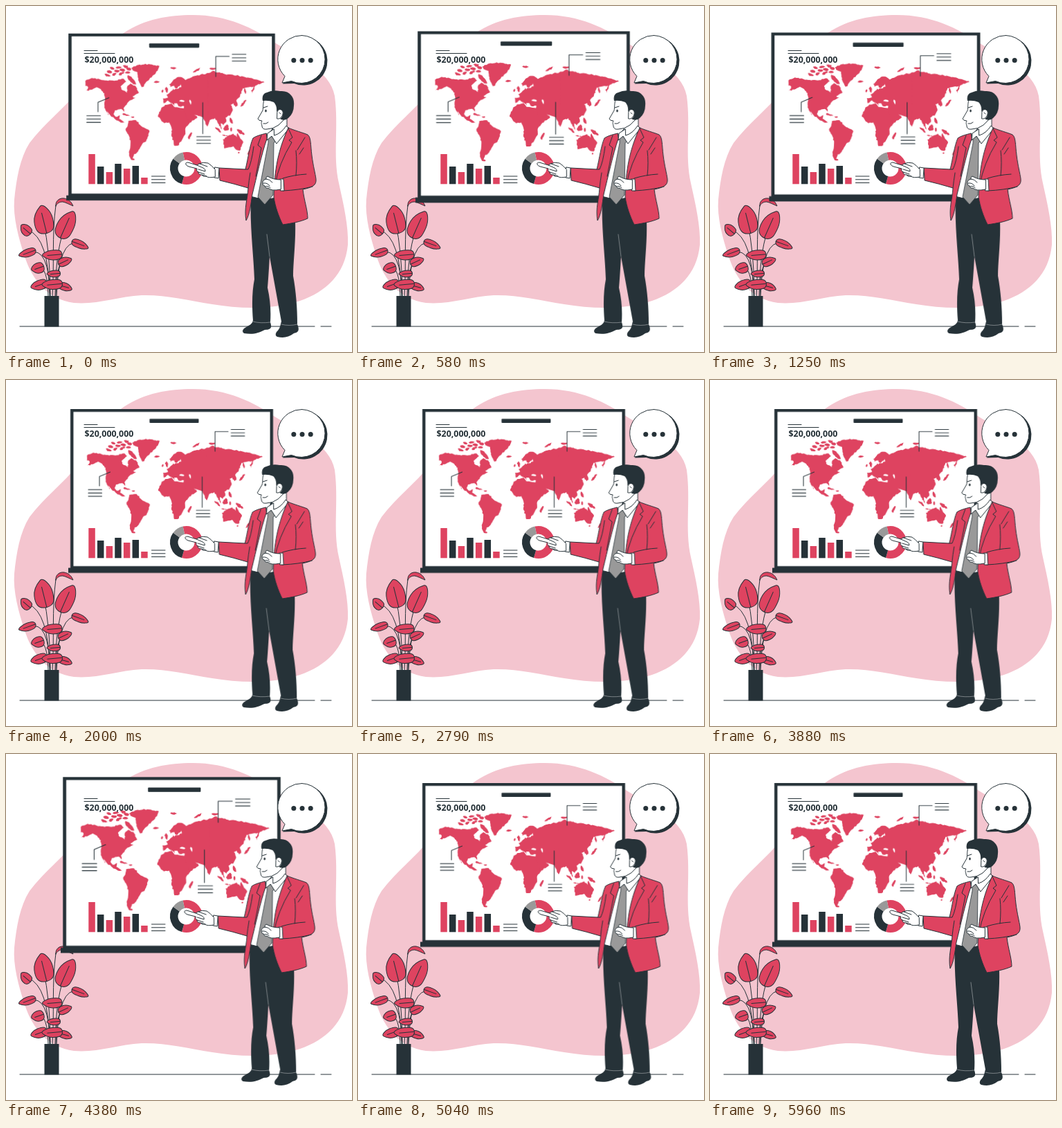
Animation of 500x500 px, one loop 6000 ms. Source, as an HTML page:

```html
<!DOCTYPE html>
<html lang="en">
<head>
<meta charset="utf-8">
<title>Presentation</title>
<style>
  :root { --ink: #263238; --pink: #de4360; --gray: #999; }
  html, body { margin: 0; width: 100%; height: 100%; overflow: hidden; background: #fff; }
  svg { display: block; width: 100vw; height: 100vh; }
  path, circle, ellipse, rect { stroke-linecap: round; stroke-linejoin: round; }
  .k { fill: var(--ink); }
  .r { fill: var(--pink); }
  .l { fill: none; stroke: var(--ink); stroke-width: 1; }
  .p { fill: var(--pink); stroke: var(--ink); stroke-width: 1; }
  .w { fill: #fff; stroke: var(--ink); stroke-width: 1; }
  .g { fill: var(--gray); stroke: var(--ink); stroke-width: .8; }
  .sum { font: 700 12.4px "Open Sans", "Noto Sans", Roboto, sans-serif; font-stretch: 75%; }
  .board {
    transform-origin: 239.5px 160px;
    animation: beat 3s linear -40ms infinite;
  }
  .man { animation: shake 6s linear -40ms infinite; }
  @keyframes beat {
    0%, 30%, 40%, 60%, 100% { transform: scale(1); }
    10%, 50% { transform: scale(1.1); }
  }
  @keyframes shake {
    0%, 100% { transform: translateX(0); }
    10%, 90% { transform: translateX(-1px); }
    20%, 80% { transform: translateX(2px); }
    30%, 50%, 70% { transform: translateX(-4px); }
    40%, 60% { transform: translateX(4px); }
  }
</style>
</head>
<body>
<svg viewBox="0 0 500 500">
  <path fill="#f4c5cf" d="M270 13C320 13 358 32 390 54C420 72 468 92 475 130C481 175 472 215 481 256C488 288 495 318 494 345C490 388 462 413 425 426C385 439 340 438 298 431C262 425 230 417 196 418C160 420 132 432 98 429C60 424 38 396 27 362C18 335 10 305 12 280C15 250 20 220 34 198C54 171 82 150 105 122C130 90 140 60 170 39C200 19 235 13 270 13Z"/>
  <path class="l" d="M20 463H446M455 463H470"/>

  <g id="plant">
    <path class="l" d="M72 288C66 330 70 380 67 420M54 312Q64 355 64 420M87 316Q72 345 71 420M32 324Q62 334 63 420M34 357Q62 345 64 420M104 343Q76 335 73 420M79 371Q72 385 72 420M47 379Q60 375 61 420"/>
    <path class="p" d="M72 289C71 282 77 277 84 278C91 279 95 284 97 289C92 287 87 284 82 283C77 283 74 285 72 289Z"/>
  </g>
  <rect class="k" x="55.5" y="419" width="21" height="44.5"/>

  <g class="board">
    <rect class="k" x="93" y="42" width="293" height="232"/>
    <rect x="97.5" y="46" width="284" height="223" fill="#fff"/>
    <rect class="k" x="90" y="271.5" width="299" height="7.3"/>
    <rect class="k" x="207.5" y="56" width="71" height="6" rx="1"/>
    <g id="map"></g>
    <path class="l" d="M150.5 133L135 139.5V153M302 103V74.5H321M283.5 140V184"/>
    <g id="notes"></g>
  </g>

  <path class="l" d="M113 64.5H132M113 68.5H157"/>
  <g id="legend"></g>
  <text class="sum k" x="113.5" y="82">$20,000,000</text>
  <g id="bars"></g>
  <g id="donut" fill="none" stroke-width="11.5"></g>

  <path class="k" d="M429.5 44.5a35 35 0 1 1-13 67.5L400 112.5L405 103.5A35 35 0 0 1 429.5 44.5Z"/>
  <path class="w" d="M427.5 42.5a34.5 34.5 0 1 1-15 66L399 111L403 101.5A34.5 34.5 0 0 1 427.5 42.5Z"/>
  <g id="dots" class="k"></g>

  <g class="man">
    <path class="k" d="M354 274L388 276L418 312C419 340 415 370 415 390C419 412 421 436 421 460C425 469 422 472 416 473C408 479 401 480 392 478Q388 476 391 471C397 465 396 462 398 456L381 362C380 380 379 395 378 407C382 425 383 440 382 457C385 466 382 468 374 468C364 473 357 475 344 473Q340 470 344 466C352 461 356 460 357 454C355 430 356 410 359 395C358 360 352 318 354 274Z"/>
    <path d="M381 362L377 330M357 456Q368 459 382 457M398 460Q409 463 421 460" fill="none" stroke="#fff" stroke-width=".6" opacity=".65"/>

    <path class="w" d="M376 188L386 177L405 174L404 194L392 277Q372 281 353 275L360 230Z"/>
    <path class="w" d="M386 169L385 182L389 189L406 175V158Z"/>
    <path class="g" d="M382 189L389 188L391 193L387 198L386 273L374 287L364 276L379 198V193Z"/>
    <path class="w" d="M387 178L378 184L377 194L384 188L391 199L409 177L405 173Q398 184 388 187Z"/>

    <path class="p" d="M376 184C368 186 361 188 357 191C352 202 350 220 346 236L308 234L309 252Q330 257 350 263C349 280 344 292 347 310C352 302 354 286 356 272C362 248 369 215 377 192Z"/>
    <path class="l" d="M358 203Q355 226 350 236H346M353 241Q351 253 350 263M369 187L364 201L369 205L361 246"/>
    <path class="p" d="M408 176C417 180 429 183 436 186C441 190 440 200 442 216C444 232 447 242 448 250C449 259 443 262 429 265C431 282 436 295 436 307C425 312 413 314 400 316C394 304 389 290 387 276C388 246 390 215 408 176Z"/>
    <path class="l" d="M408 177L414 190L409 194L413 197Q394 228 389 258M419 209Q421 226 419 245M432 190L421 208M430 205L424 214M400 249Q416 244 434 243M400 267Q424 266 443 261"/>

    <path class="w" d="M396 250H401L402 267H397Z"/>
    <path class="w" d="M397 251Q386 251 378 246Q375 247 376 250Q370 252 371 256Q370 259 374 260Q375 264 379 263Q383 268 397 265Z"/>
    <path class="l" d="M376 250Q381 250 385 255M372 256Q378 255 381 260M375 261Q379 259 382 263"/>

    <path class="w" d="M302 233L308 234L307 249L301 248Z"/>
    <path class="w" d="M302 236Q297 230 292 227Q285 225 279 228L276 230L263 226Q259 226 260 229Q261 231 264 232L276 235Q274 238 278 240Q278 244 283 244Q284 247 289 246Q293 249 302 247Z"/>
    <path class="l" d="M276 230L285 234Q289 236 288 239L278 236M278 240L287 243M283 244L290 246M280 228L291 232"/>

    <path class="w" d="M373 135C371 143 372 147 371 151L364 163Q365 166 370 166C368 170 370 171 370 174Q371 179 377 178Q386 178 394 172L404 162V136L390 129Z"/>
    <path class="k" d="M371 137Q369 127 377 125Q385 121 396 123Q407 122 412 129Q417 134 416 144Q416 155 408 162Q402 167 396 163Q401 160 400 153Q398 148 393 151L391 153Q392 144 387 139Q380 136 371 137Z"/>
    <path class="w" d="M392 153Q394 148 398 150Q402 153 399 159Q396 164 392 163Z"/>
    <path class="l" d="M372 147L378 145M372 170Q376 171 379 168M395 154L397 156"/>
    <ellipse class="k" cx="375.5" cy="151.5" rx="1.2" ry="2"/>
  </g>
</svg>
<script>
  const el = (parent, tag, attrs) => {
    const node = document.createElementNS('http://www.w3.org/2000/svg', tag);
    for (const key in attrs) node.setAttribute(key, attrs[key]);
    document.getElementById(parent).appendChild(node);
  };

  // Leaf: centre, half length, half width, tilt of the tip
  const leaf = (x, y, a, b, deg) => {
    const transform = `translate(${x} ${y}) rotate(${deg})`;
    el('plant', 'path', { class: 'p', transform, d:
      `M${-a} 0C${-a} ${-b} ${-a / 2} ${-b * 1.1} 0 ${-b}S${a * .8} ${-b * .4} ${a} 0S${a / 2} ${b} 0 ${b}S${-a} ${b} ${-a} 0Z` });
    el('plant', 'path', { class: 'l', transform, d: `M${-a} 0H${a / 2}` });
  };
  leaf(54, 309, 20, 13.5, -104);
  leaf(87, 316, 21, 12, -66);
  leaf(28.5, 323.5, 9, 7, -140);
  leaf(31, 357, 12.5, 5.5, 160);
  leaf(107, 344.5, 12.5, 5.5, 20);
  leaf(85, 369, 10, 6, -25);
  leaf(46, 379, 9, 7.5, 160);
  leaf(48, 403.5, 12, 7, 160);
  leaf(86, 406, 9.5, 5.5, 15);
  leaf(67, 360, 14, 7, 175);
  leaf(69, 387, 9.5, 4.7, 175);
  leaf(67, 402.5, 14.5, 7, 175);

  const note = (parent, x, y) => el(parent, 'path', { class: 'l',
    d: [0, 1, 2].map(i => `M${x} ${y + i * 4.75}h19.5`).join('') });
  note('notes', 119, 158.5);
  note('notes', 325.3, 71.5);
  note('notes', 275, 188.3);
  note('legend', 210.5, 246);

  for (let i = 0; i < 3; i++) el('dots', 'circle', { cx: 415.8 + i * 12.2, cy: 78.5, r: 3.5 });

  [214, 232, 240, 228, 235, 231, 248].forEach((y, i) => el('bars', 'rect',
    { class: i % 2 ? 'k' : 'r', x: 119.3 + i * 12.65, y, width: 9.5, height: 257.3 - y }));

  const arc = (from, to, stroke) => {
    const at = deg => {
      const a = deg * Math.PI / 180;
      return `${260.5 + 17.7 * Math.sin(a)} ${234.5 - 17.7 * Math.cos(a)}`;
    };
    el('donut', 'path', { stroke, style: 'stroke-linecap:butt',
      d: `M${at(from)}A17.7 17.7 0 ${+(to - from > 180)} 1 ${at(to)}` });
  };
  el('donut', 'circle', { cx: 260.5, cy: 234.5, r: 13, fill: '#fff' });
  arc(-12, 196, 'var(--pink)');
  arc(196, 306, 'var(--ink)');
  arc(306, 348, 'var(--gray)');

  // Coastlines: seeded offsets roughen a coarse outline
  let seed = 7;
  const rnd = () => (seed = seed * 16807 % 2147483647) / 2147483647 - .5;
  const coast = (pts, fill = 'var(--pink)') => {
    const out = pts.flatMap(([x, y], i) => {
      const [u, v] = pts[(i + 1) % pts.length];
      const n = Math.max(1, Math.round(Math.hypot(u - x, v - y) / 2.2));
      return Array.from({ length: n }, (_, k) => {
        const j = k ? 1.6 : 0;
        return `${(x + (u - x) * k / n + j * rnd()).toFixed(1)} ${(y + (v - y) * k / n + j * rnd()).toFixed(1)}`;
      });
    });
    el('map', 'path', { d: `M${out.join('L')}Z`, fill });
  };
  const land = text => coast(text.split(' ').map(p => p.split(',').map(Number)));
  const isle = (x, y, a, b, deg = 0, fill) => {
    const t = deg * Math.PI / 180;
    coast(Array.from({ length: 7 }, (_, i) => {
      const q = i * Math.PI / 3.5, r = 1 + rnd() * .5;
      const u = a * r * Math.cos(q), v = b * r * Math.sin(q);
      return [x + u * Math.cos(t) - v * Math.sin(t), y + u * Math.sin(t) + v * Math.cos(t)];
    }), fill);
  };

  // North America
  land('117,109 126,105 142,108 158,109 171,106 175,110 167,117 168,121 176,126 177,116 181,113 188,116 193,126 184,131 188,133 180,137 174,144 171,148 172,153 168,149 159,151 157,156 160,160 166,158 165,163 174,169 167,168 154,160 148,152 150,158 144,147 145,134 144,127 139,121 133,118 117,124 121,118 117,116');
  // South America
  land('178,166 189,165 196,173 208,180 203,195 198,198 190,211 186,213 184,219 187,221 182,221 179,215 181,198 180,190 174,178 177,173');
  // Greenland
  land('182,91 190,87 202,85 222,88 217,98 203,111 200,117 197,118 193,110 191,97 184,94');
  // Arctic islands
  for (let i = 0; i < 11; i++)
    isle(148 + i * 3.2 + rnd() * 3, 101 - i % 3 * 4.5 - i * .4, 4, 1.9, rnd() * 60);
  isle(182, 107, 9, 3, 45);
  // Africa
  land('225,147 232,143 240,142 243,146 256,148 260,156 263,163 268,162 264,170 259,176 259,184 253,195 248,201 243,201 239,185 240,179 236,168 229,169 220,160');
  isle(265.5, 187, 2, 6, 20);
  // Europe and western Asia
  land('228,141 227,134 234,133 232,129 241,122 241,118 243,122 253,118 252,114 246,120 243,116 238,118 236,114 247,104 254,104 259,108 272,102 292,98 294,162 290,174 284,161 271,156 276,161 264,170 255,150 257,145 249,145 247,141 243,141 244,146 237,137 241,144 234,137');
  // Eastern Asia
  land('290,98 298,95 313,99 335,102 358,107 371,111 358,116 354,127 352,123 356,117 340,120 336,132 331,137 333,144 330,146 327,141 323,143 326,149 323,157 316,161 317,167 313,172 309,169 311,180 304,167 301,162 290,166');
  // Inland seas
  isle(254, 137.5, 3.5, 1.4, 5, '#fff');
  isle(266, 139, 1.5, 3.5, -15, '#fff');
  // Northern islands
  isle(232, 122, 2, 4.5, -20);
  isle(226.5, 123.5, 1.5, 2);
  isle(218, 110.5, 4, 1.6);
  isle(274, 94.5, 7, 1.3, -30);
  isle(242, 91, 4.5, 1.3);
  isle(298, 92, 4.5, 1.3);
  // Caribbean
  isle(174.5, 157, 5, 1, 15);
  isle(184, 160.5, 2.5, 1);
  // Japan and the southeast
  isle(343.5, 123, 1, 4, -10);
  isle(341, 141, 1.6, 7, 40);
  isle(306, 179, 1.8, 6, -45);
  isle(317, 176, 3.7, 4.5, 20);
  isle(315, 186.5, 5, .9, 8);
  isle(324, 178, 1.5, 3);
  isle(324, 166, 1.5, 5, -20);
  isle(337.5, 182, 6.5, 2, 30);
  // Oceania
  land('312,192 321,186 327,184 332,189 333,183 336,189 341,196 336,208 331,207 327,202 314,205');
  isle(334.5, 211, 1.3, 1.3);
  isle(350, 209, 1.4, 5, 35);
</script>
</body>
</html>
```
